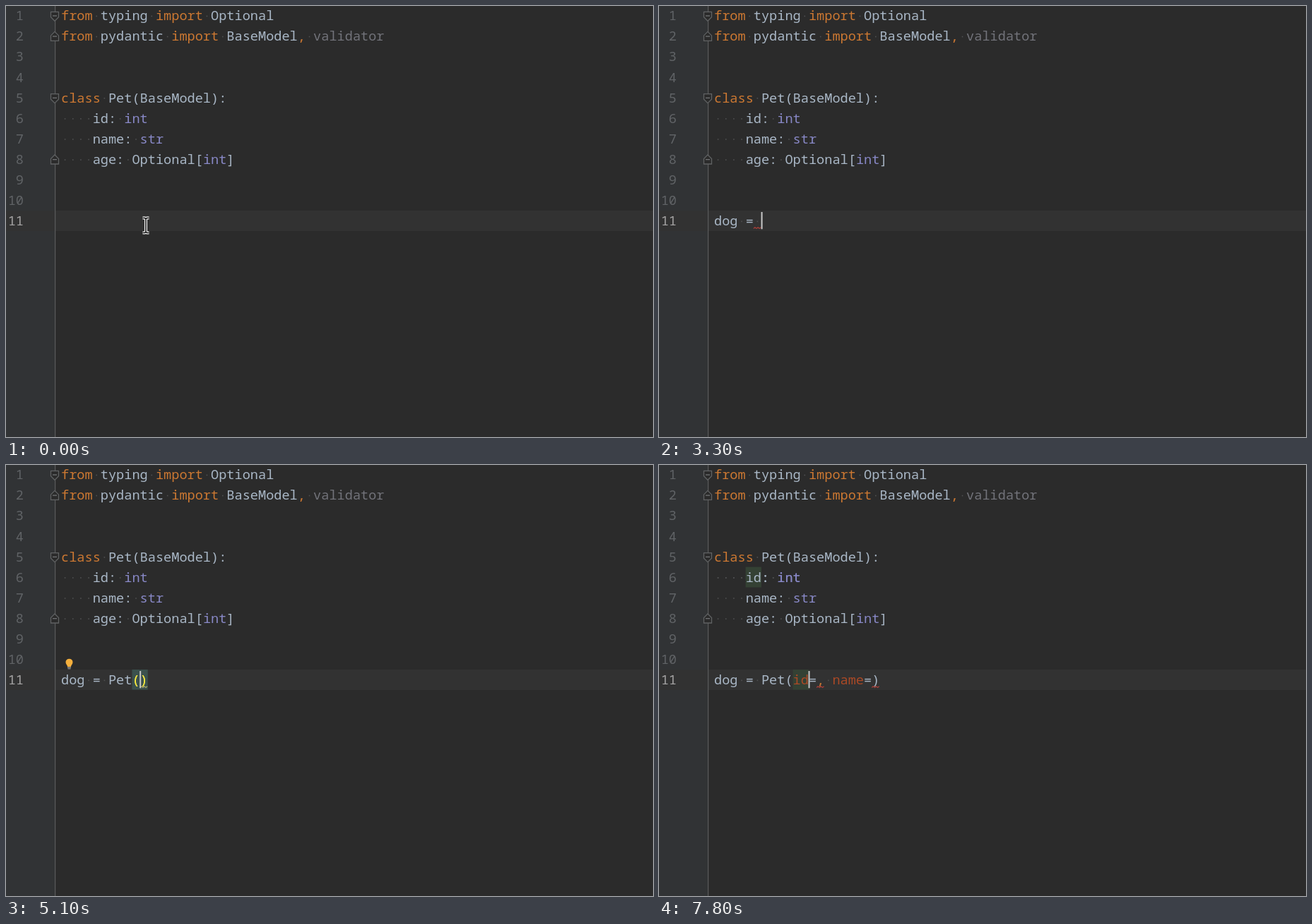
An HTML page for the animation above (8000 ms loop, 916 px wide and 611 px high).

```html
<!DOCTYPE html>
<html lang="en">
<head>
<meta charset="utf-8">
<title>Editor completion</title>
<style>
  html, body { margin: 0; width: 100%; height: 100%; overflow: hidden; background: #2b2b2b; }
  svg { display: block; width: 916px; height: 611px; }
  text { white-space: pre; }
  .mono { font: 18.6px "Noto Sans Mono", "DejaVu Sans Mono", monospace; font-variant-ligatures: none; }
  .ui { font-family: "DejaVu Sans", "Noto Sans", sans-serif; font-size: 18.6px; }
</style>
</head>
<body>
<svg viewBox="0 0 916 611">
  <g id="base"></g>
  <g id="live"></g>
</svg>
<script>
const LOOP = 8000, CELL = 11.16, LEFT = 78, PITCH = 29.1, ROW = 11;
const COLORS = {
  from: '#cc7832', import: '#cc7832', class: '#cc7832', ',': '#cc7832',
  int: '#8888c6', str: '#8888c6', validator: '#72737a'
};
const SOURCE = [
  'from typing import Optional',
  'from pydantic import BaseModel, validator',
  '', '',
  'class Pet(BaseModel):',
  '    id: int',
  '    name: str',
  '    age: Optional[int]'
];

const colX = col => LEFT + col * CELL;
const rowTop = row => 290 + (row - ROW) * PITCH;
const baseline = row => rowTop(row) + 21.2;

const rect = (x, y, w, h, fill, extra = '') =>
  `<rect x="${x}" y="${y}" width="${w}" height="${h}" fill="${fill}" ${extra}/>`;
const path = (d, fill, extra = '') => `<path d="${d}" fill="${fill}" ${extra}/>`;
const label = (x, y, str, fill, cls = 'mono', extra = '') =>
  `<text x="${x}" y="${y}" class="${cls}" fill="${fill}" ${extra}>${str}</text>`;

function codeLine(str, row, colors = COLORS) {
  const y = baseline(row);
  let out = '';
  for (const { 0: token, index } of str.matchAll(/\w+|\s|[,()]|[^\w\s,()]+/g)) {
    out += token === ' '
      ? rect(colX(index + .5) - .8, y - 6.6, 1.6, 1.6, '#505152')
      : label(colX(index), y, token, colors[token] || '#a9b7c6');
  }
  return out;
}

function foldMark(row, down) {
  const y = rowTop(row) + 15.3, s = down ? 1 : -1;
  return path(`M63.5 ${y - 6 * s}H74.5V${y + 1.5 * s}L69 ${y + 7 * s}L63.5 ${y + 1.5 * s}Z`, '#2b2b2b', 'stroke="#606263" stroke-width="1.3"')
    + rect(66, y - 1, 6, 1.3, '#707274');
}

function wave(col, color) {
  const x = colX(col);
  let d = `M${x} 315.5`;
  for (let i = 1; i <= 5; i++) d += `L${x + i * 2.1} ${i % 2 ? 313.7 : 315.5}`;
  return path(d, 'none', `stroke="${color}" stroke-width="1.2"`);
}

function bulb(x, y) {
  return path(`M${x - 2.5} ${y + 4.5}C${x - 2.5} ${y + 2} ${x - 5} ${y + 1} ${x - 5} ${y - 2}a5 4.8 0 0 1 10 0C${x + 5} ${y + 1} ${x + 2.5} ${y + 2} ${x + 2.5} ${y + 4.5}Z`, '#f4af3d')
    + rect(x - 2.5, y + 5, 5, 1.2, '#a9a9a9') + rect(x - 2, y + 6.8, 4, 1.2, '#8a8a8a');
}

const wrench = (x, y) =>
  path(`M${x - 4.5} ${y + 5}L${x + 2} ${y - 1}`, 'none', 'stroke="#afb1b3" stroke-width="2.8"')
  + path(`M${x + 4} ${y - 5.5}A4 4 0 1 0 ${x + 6} ${y - 2.5}`, 'none', 'stroke="#afb1b3" stroke-width="2.4"');

const pencil = (x, y) =>
  path(`M${x - 5} ${y - 3.5}h7M${x - 5} ${y - .5}h5M${x - 5} ${y + 2.5}h3`, 'none', 'stroke="#afb1b3" stroke-width="1.3"')
  + path(`M${x} ${y + 4}L${x + 5.5} ${y - 2}`, 'none', 'stroke="#afb1b3" stroke-width="2.5"');

const frame = (x, y, w, h, fill) =>
  rect(x - 3, y - 3, w + 6, h + 6, '#777', 'rx="4" opacity=".22"')
  + rect(x - 1.5, y - 1.5, w + 3, h + 3, '#777', 'rx="2" opacity=".4"')
  + rect(x, y, w, h, fill);

function kindIcon(x, y, kind) {
  const [fill, ink] = { C: ['#3f87a2', '#24404b'], f: ['#a47396', '#49343f'], v: ['#c0804e', '#503a2a'] }[kind];
  return `<circle cx="${x}" cy="${y}" r="6.7" fill="${fill}"/>`
    + label(x, y + 3.4, kind, ink, 'ui', 'text-anchor="middle" style="font-size:9.5px;font-weight:bold"');
}

function completion({ col, prefix, items, opacity = 1 }) {
  const x = colX(col) - 26, top = 318.5, step = 25.5, end = top + items.length * step;
  let out = frame(x, top, 820, end + 22.5 - top, '#46484a') + rect(x, top, 820, step, '#515457');
  items.forEach(([kind, name, origin = 'builtins'], i) => {
    const y = top + i * step + 13, at = name.toLowerCase().indexOf(prefix.toLowerCase());
    const hit = name.substr(at, prefix.length);
    out += kindIcon(x + 14, y, kind)
      + label(x + 25.5, y + 6.4, name.replace(hit, `<tspan fill="#589df6">${hit}</tspan>`), '#bbbbbb')
      + label(x + 719, y + 6.4, origin, '#8c8c8c');
  });
  const small = 'style="font-size:16.4px"';
  out += label(x + 4, end + 16, 'Press Enter to insert, Tab to replace', '#808284', 'ui', small)
    + label(x + 309.5, end + 16, 'Next Tip', '#589df6', 'ui', small);
  return `<g opacity="${opacity}">${out}</g>`;
}

const MENU = [
  [bulb, 'Insert required arguments', 331.5, true],
  [bulb, 'Reformat file', 356, true],
  [wrench, 'Edit inspection profile setting', 380.7],
  [bulb, 'Ignore errors like this', 405.3],
  [pencil, "Inspection 'Incorrect call arguments' options", 430, true],
  [pencil, 'Insert all arguments', 457, true]
];

function intentionMenu() {
  let out = frame(190, 319, 460, 173, '#3c3f41') + rect(190, 319, 460, 25, '#2f65ca')
    + rect(190, 443, 460, 1, '#555759') + rect(190, 469.5, 460, 22.5, '#46484a');
  MENU.forEach(([icon, str, y, more], i) => {
    out += icon(203.5, y) + label(214.2, y + 6.4, str, i ? '#bbbbbb' : '#c6cad2', 'ui');
    if (more) out += path(`M634.5 ${y - 4}L640.5 ${y}L634.5 ${y + 4}Z`, i ? '#a0a2a4' : '#ffffff');
  });
  return out + label(193.5, 487, 'Press Alt+Space to open preview', '#808284', 'ui', 'style="font-size:17.1px"');
}

const parameterHint = () =>
  path('M182.5 278H196.5L189.5 287Z', '#5b5d5d')
  + rect(-8, 243.5, 395.5, 35, '#4b4d4d', 'stroke="#636565" rx="2"')
  + label(1.2, 267.3, '<tspan font-weight="bold" fill="#e6e6e6">id: int,</tspan> name: str, age: Optional[int]=...', '#bbbbbb', 'ui');

const pointer = y => {
  const d = `M193.5 ${y - 10.5}h3l1.5 1l1.5 -1h3M198 ${y - 9.5}v19M193.5 ${y + 10.5}h3l1.5 -1l1.5 1h3`;
  return path(d, 'none', 'stroke="#ffffff" stroke-width="4"') + path(d, 'none', 'stroke="#111111" stroke-width="1.6"');
};

const P_ITEMS = [
  ['C', 'Pet', ''], ['C', 'PendingDeprecationWarning'], ['C', 'PermissionError'],
  ['C', 'ProcessLookupError'], ['f', 'print'], ['f', 'pow'], ['C', 'property']
];
const docPopup = opacity => ({ col: 0, prefix: 'do', items: [['v', '__doc__']], opacity });

// Each entry changes part of the state at its time; caret is a column or null.
const EVENTS = [
  [0, { text: '', caret: null, mouse: 311 }],
  [300, { mouse: 308 }],
  [400, { mouse: 304 }],
  [500, { mouse: 301 }],
  [600, { mouse: 299.5, caret: 0 }],
  [1100, { caret: null }],
  [1600, { caret: 0 }],
  [2200, { text: 'd', caret: 1, mouse: null }],
  [2300, { text: 'do', caret: 2, popup: docPopup(1) }],
  [2400, { text: 'dog', caret: 3, popup: docPopup(.07) }],
  [2600, { text: 'dog ', caret: 4, popup: null }],
  [2700, { text: 'dog =', caret: 5 }],
  [2900, { text: 'dog = ', caret: 6 }],
  [3300, { errors: [5] }],
  [3500, { text: 'dog = P', caret: 7 }],
  [3600, { popup: { col: 6, prefix: 'P', items: P_ITEMS } }],
  [3700, { text: 'dog = Pe', caret: 8, popup: { col: 6, prefix: 'Pe', items: P_ITEMS.slice(0, 3) } }],
  [4000, { text: 'dog = Pet', caret: 9, popup: null }],
  [4300, { text: 'dog = Pet()', caret: 10, braces: [9, 10] }],
  [4600, { errors: [] }],
  [5000, { warning: 10 }],
  [5100, { bulb: true }],
  [5300, { hint: true }],
  [5700, { caret: null }],
  [6000, { menu: true, warning: null }],
  [6600, { menu: false }],
  [6700, { hint: false, caret: 10 }],
  [7000, { text: 'dog = Pet(id=, name=)', braces: [9, 20], usage: true }],
  [7600, { bulb: false, caret: 11, braces: [] }],
  [7700, { caret: 12 }],
  [7800, { errors: [13, 20] }]
];

const ARGUMENT_COLORS = { ...COLORS, id: '#aa4926', name: '#aa4926' };

function draw(s) {
  let out = '';
  if (s.usage) {
    out += rect(colX(4), rowTop(6), CELL * 2, 29, '#344134') + codeLine(SOURCE[5], 6)
      + rect(colX(10), 290, CELL * 2, 28.5, '#344134');
  }
  for (const col of s.braces) out += rect(colX(col), 290, CELL, 28.5, '#3b514d');
  out += codeLine(s.text, ROW, ARGUMENT_COLORS);
  for (const col of s.braces) out += label(colX(col), baseline(ROW), s.text[col], '#ffef28', 'mono', 'font-weight="bold"');
  for (const col of s.errors) out += wave(col, '#a83f39');
  if (s.warning) out += wave(s.warning, '#a5a46a');
  if (s.bulb) out += bulb(89.5, 281.5);
  if (s.caret !== null) out += rect(colX(s.caret) - .4, 292, 2, 24.3, '#c8c8c8');
  if (s.hint) out += parameterHint();
  if (s.popup) out += completion(s.popup);
  if (s.menu) out += intentionMenu();
  if (s.mouse) out += pointer(s.mouse);
  return out;
}

function drawBase() {
  let out = rect(0, 0, 916, 611, '#2b2b2b') + rect(0, 0, 69, 611, '#313335')
    + rect(0, 290, 916, 29, '#323232') + rect(69, 0, 1.2, 611, '#5a5b5c');
  for (let row = 1; row <= ROW; row++) {
    out += label(25 - CELL * String(row).length, baseline(row), row, row === ROW ? '#a4a3a3' : '#606366');
  }
  SOURCE.forEach((str, i) => out += codeLine(str, i + 1));
  return out + foldMark(1, true) + foldMark(2, false) + foldMark(5, true) + foldMark(8, false);
}

const live = document.getElementById('live');
document.getElementById('base').innerHTML = drawBase();
let shown = -1;

function update(time) {
  const past = EVENTS.filter(([at]) => at <= time);
  if (past.length !== shown) {
    shown = past.length;
    live.innerHTML = draw(Object.assign({ errors: [], braces: [] }, ...past.map(e => e[1])));
  }
}

const start = performance.now();
function tick() {
  update((performance.now() - start) % LOOP);
  requestAnimationFrame(tick);
}
tick();
</script>
</body>
</html>
```
